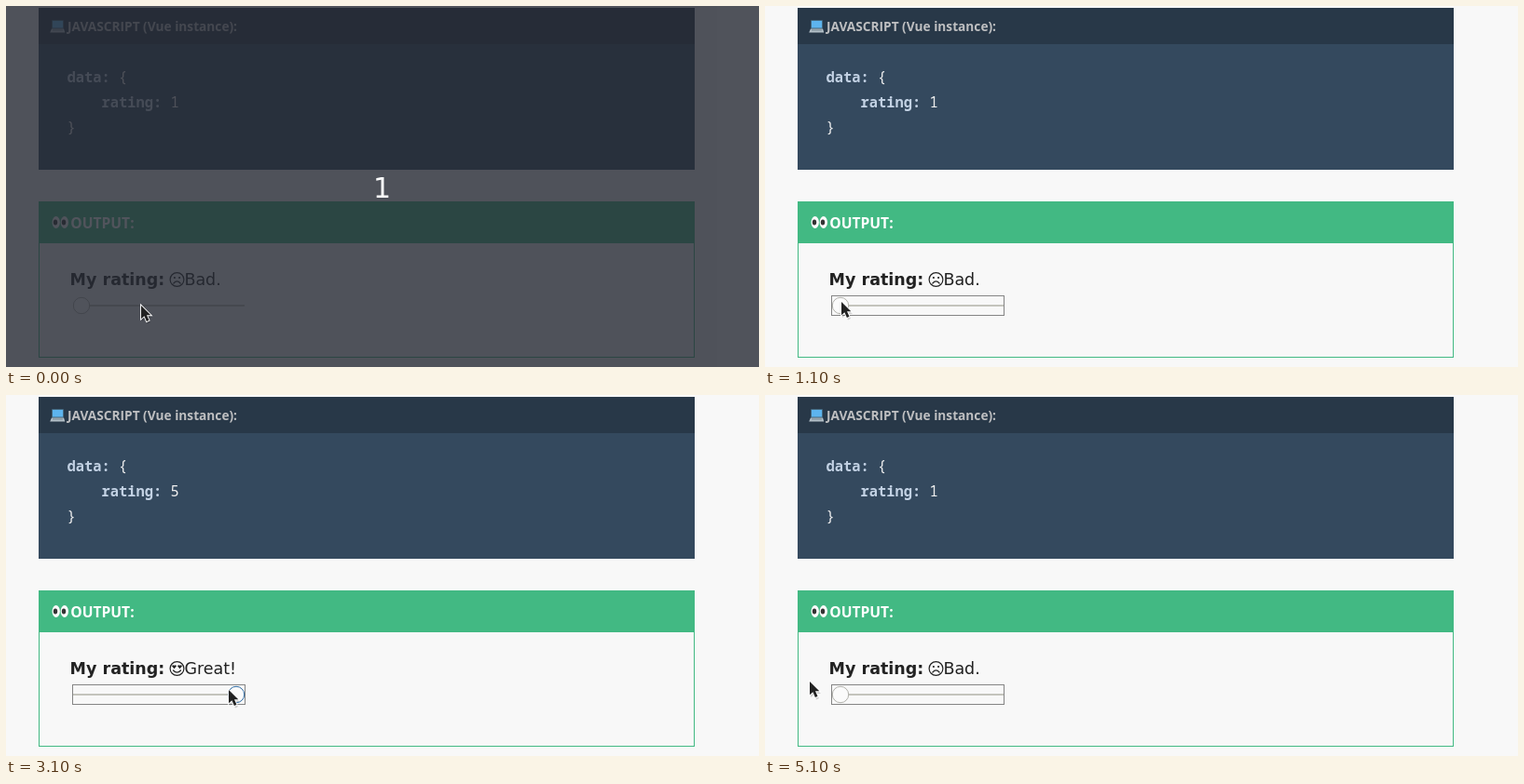
Animation of 808x388 px, one loop 5400 ms. Source, as an HTML page:

```html
<!DOCTYPE html>
<html lang="en">
<head>
<meta charset="utf-8">
<title>Rating slider</title>
<style>
  html, body { margin: 0; width: 100%; height: 100%; overflow: hidden; background: #f8f8f8; }
  svg { display: block; }
  text { white-space: pre; }
  .head { font: 700 13.7px "Open Sans", sans-serif; fill: #bebfc1; }
  .title { font: 700 15.6px "Open Sans", sans-serif; fill: #fff; }
  .code { font: 400 15.4px "Noto Sans Mono", monospace; fill: #f0f0f0; }
  .key { font-weight: 600; fill: #c3d2e4; }
  .out { font: 17.5px "DejaVu Sans", sans-serif; fill: #222; }
  .count { font: 30px "DejaVu Sans", sans-serif; fill: #fff; text-anchor: middle; }
  .face { fill: none; stroke: #222; stroke-width: 1.2; stroke-linecap: round; }
  .face .dot { fill: #222; stroke: none; }
</style>
</head>
<body>
<svg width="808" height="388" viewBox="0 0 808 388">
  <rect width="808" height="388" fill="#f8f8f8"/>

  <rect x="35" y="2" width="704" height="174" fill="#34495e"/>
  <rect x="35" y="2" width="704" height="39" fill="#283848"/>
  <g id="laptop">
    <rect x="49" y="15" width="13" height="9.5" rx="1" fill="#43687f"/>
    <rect x="50" y="16" width="11" height="7.5" fill="#5db4ee"/>
    <path d="M49 24.5H62L63.3 28.5H47.2Z" fill="#b4c0c8"/>
    <path d="M50 26H61" stroke="#72848e"/>
  </g>
  <text class="head" x="66" y="27">JAVASCRIPT (Vue instance):</text>
  <text class="code" x="65.5" y="82"><tspan class="key">data:</tspan> {</text>
  <text class="code" x="102.5" y="109"><tspan class="key">rating:</tspan> <tspan id="digit">1</tspan></text>
  <text class="code" x="65.5" y="136">}</text>

  <rect x="35.5" y="210.5" width="703" height="167" fill="none" stroke="#42b983"/>
  <rect x="35" y="210" width="704" height="45" fill="#42b983"/>
  <g id="eyes">
    <ellipse cx="53.7" cy="232.5" rx="4.2" ry="6.5" fill="#fafafa"/>
    <ellipse cx="62.8" cy="232.5" rx="4.2" ry="6.5" fill="#fafafa"/>
    <ellipse cx="53" cy="232.5" rx="2.2" ry="3" fill="#333"/>
    <ellipse cx="62" cy="232.5" rx="2.2" ry="3" fill="#333"/>
  </g>
  <text class="title" x="69.3" y="239">OUTPUT:</text>

  <text class="out" x="68.6" y="300" font-weight="700" style="font-weight:700">My rating:</text>
  <g id="face" class="face" transform="translate(183.5 294)"></g>
  <text id="word" class="out" x="191.4" y="300"></text>

  <path d="M72 322H256" stroke="#c4c4bc" stroke-width="2"/>
  <circle id="thumb" cy="322" r="8.7" fill="#fbfbfb"/>
  <rect id="focus" x="71.5" y="311.5" width="185" height="21" fill="none" stroke="#111" stroke-dasharray="1 1"/>

  <g id="veil">
    <rect width="808" height="388" fill="#262a34" fill-opacity=".8"/>
    <text class="count" x="403.5" y="205.5">1</text>
  </g>

  <g id="cursor">
    <path d="M1 2V17L4.5 14L7 19.5L10 18L7.5 13H12Z" fill="#000" opacity=".16"/>
    <path d="M0 0V14.3L3.4 11.2L5.9 17L8.5 15.8L6 10.3H10.3Z" fill="#222" stroke="#fff" paint-order="stroke" stroke-width="1.8"/>
  </g>
</svg>
<script>
const LOOP = 5400, STEP = 100;
const $ = id => document.getElementById(id);

// time, x, y of the pointer tip
const path = [
  [0, 145, 322], [100, 142, 321], [600, 96, 317], [900, 82, 318], [1100, 82, 318],
  [1600, 120, 314], [2100, 198, 314], [2800, 255, 316], [2900, 255, 316], [3100, 239, 317],
  [3500, 164, 320], [3700, 163, 319], [4100, 128, 318], [4300, 128, 318], [4400, 127, 318],
  [4500, 127, 318], [5100, 48, 308], [LOOP, 48, 308]
];

const ring = '<circle r="7.4"/>';
const eyes = '<circle class="dot" cx="-2.6" cy="-2" r="1.1"/><circle class="dot" cx="2.6" cy="-2" r="1.1"/>';
const heart = x => `<path class="dot" transform="translate(${x} -2.2)" d="M0 2.4L-2.4 -.4Q-1.5 -2.6 0 -1Q1.5 -2.6 2.4 -.4Z"/>`;
const faces = [
  ['Bad.', ring + eyes + '<path d="M-3.6 4Q0 -.2 3.6 4"/>'],
  ['Not great', ring + eyes + '<path d="M-3.4 3H3.4"/>'],
  ['Ok', `<g stroke="none"><circle cx="-.5" cy="-.4" r="8.6" fill="#fcc936"/>
    <ellipse cx="-3.5" cy="-2.5" rx="1.2" ry="1.7" fill="#6b4a2b"/><ellipse cx="2.5" cy="-2.5" rx="1.2" ry="1.7" fill="#6b4a2b"/></g>
    <path d="M-4.7 2.4Q-.5 6.6 3.7 2.4" stroke="#6b4a2b"/>`],
  ['Good', ring + '<path d="M-4.3 -1.6Q-2.8 -3.8 -1.3 -1.6M1.3 -1.6Q2.8 -3.8 4.3 -1.6M-4.6 1H4.6Q3.6 5 0 5T-4.6 1Z"/>'],
  ['Great!', ring + heart(-3) + heart(3) + '<path d="M-4 2Q0 6.4 4 2"/>']
];

function pointerAt(t) {
  const i = path.findIndex(p => p[0] > t);
  const [t0, x0, y0] = path[i - 1], [t1, x1, y1] = path[i];
  const k = (t - t0) / (t1 - t0);
  return [x0 + (x1 - x0) * k, y0 + (y1 - y0) * k].map(Math.round);
}

let shown = 0;
function showRating(rating) {
  if (rating === shown) return;
  shown = rating;
  const [word, face] = faces[rating - 1];
  $('digit').textContent = rating;
  $('word').textContent = word;
  $('face').innerHTML = face;
  $('thumb').setAttribute('cx', 81 + (rating - 1) * 41.5);
}

function draw(now) {
  const t = Math.floor(now % LOOP / STEP) * STEP;
  const [x, y] = pointerAt(t);
  const focused = t >= 1100, dragging = t > 1100 && t < 5000;
  const rating = focused ? Math.round((x - 81) / 41.5) + 1 : 1;
  showRating(Math.max(1, Math.min(5, rating)));
  $('thumb').setAttribute('stroke', dragging ? '#2f6ba3' : '#b2b2ac');
  $('focus').style.display = focused ? '' : 'none';
  $('veil').style.display = t < 100 ? '' : 'none';
  $('cursor').setAttribute('transform', `translate(${x} ${y})`);
}

const start = performance.now();
function tick() {
  draw(performance.now() - start);
  requestAnimationFrame(tick);
}
tick();
</script>
</body>
</html>
```
